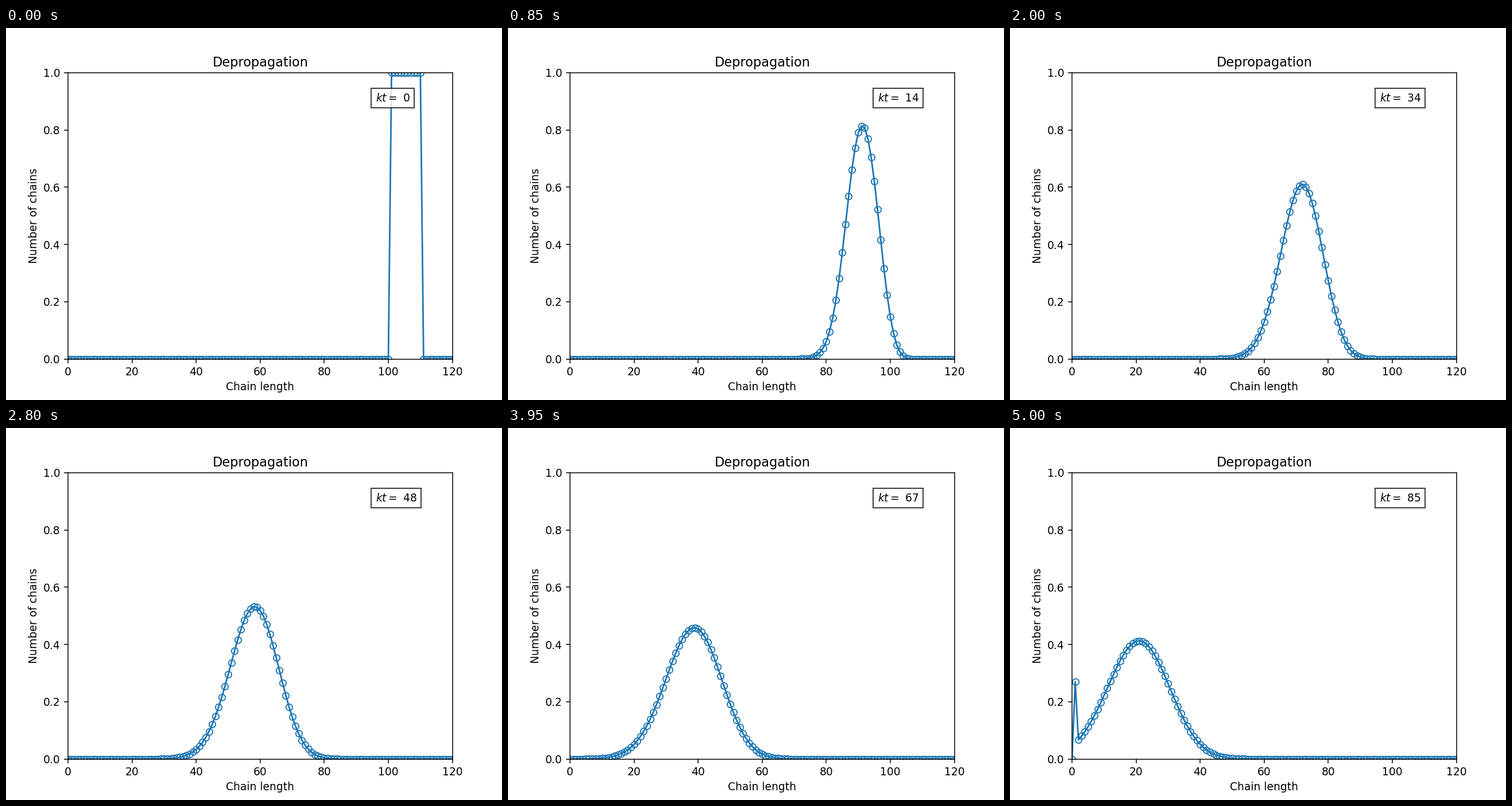
Recreate the animation shown at these times as a matplotlib script. Size 864 by 648 pixels, loop 5.05 s.

```python
import numpy as np
import matplotlib.pyplot as plt
from matplotlib.animation import FuncAnimation

FRAMES = 101
STEP = 0.85                      # advance of kt per frame
N_MAX = 120
START = np.arange(101, 111)      # chain lengths present at kt = 0
lengths = np.arange(N_MAX + 1)


def chains(kt):
    """Chains of each length when every chain loses units at rate k."""
    loss = np.cumprod(np.append(np.exp(-kt), kt / np.arange(1, N_MAX + 1)))
    n = np.zeros(N_MAX + 1)
    for m in START:
        n[2:m + 1] += loss[m - 2::-1]
        n[1] += max(0.0, 1 - loss[:m - 1].sum())
    return n


fig, ax = plt.subplots(figsize=(6.4, 4.8), dpi=135)
ax.set(xlim=(0, N_MAX), ylim=(0, 1), title="Depropagation",
       xlabel="Chain length", ylabel="Number of chains")
line, = ax.plot(lengths, chains(0), "o-", color="C0", fillstyle="none")
label = ax.text(0.8, 0.9, "", transform=ax.transAxes,
                bbox=dict(facecolor="white", alpha=0.8))


def update(i):
    kt = i * STEP
    line.set_ydata(chains(kt))
    label.set_text(f"$kt=$ {kt:.2g}")
    return line, label


def init():
    return update(0)


anim = FuncAnimation(fig, update, frames=FRAMES, init_func=init,
                     interval=50, repeat=True, repeat_delay=0, blit=False)
plt.show()
```
